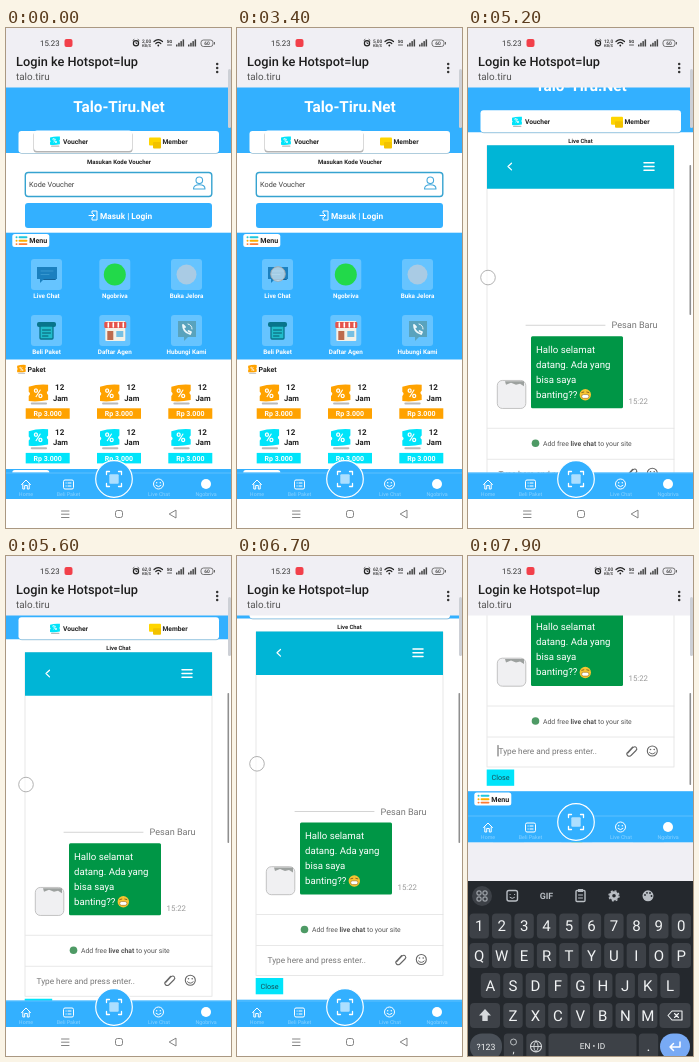
Animation of 225 by 500 pixels, one loop 8 s. Source, as an HTML page:

```html
<!DOCTYPE html>
<html lang="id">
<head>
<meta charset="utf-8">
<title>Hotspot login</title>
<style>
html, body { margin: 0; width: 100%; height: 100%; overflow: hidden; background: #fff; }
svg { display: block; width: 225px; height: 500px; font-family: Roboto, Arial, sans-serif; text-rendering: geometricPrecision; }
</style>
</head>
<body>
<svg id="stage" viewBox="0 0 225 500"></svg>
<script>
const BLUE = '#33b0ff', CYAN = '#00e4fa', ORANGE = '#ffa200', INK = '#222', PALE = '#f0eff4';

// Drawing helpers
const rect = (x, y, w, h, fill, r = 0, extra = '') =>
  `<rect x="${x}" y="${y}" width="${w}" height="${h}" rx="${r}" fill="${fill}" ${extra}/>`;
const disc = (x, y, r, fill, extra = '') => `<circle cx="${x}" cy="${y}" r="${r}" fill="${fill}" ${extra}/>`;
const line = (d, color, w = 1, extra = '') =>
  `<path d="${d}" fill="none" stroke="${color}" stroke-width="${w}" stroke-linecap="round" stroke-linejoin="round" ${extra}/>`;
const shape = (d, fill) => `<path d="${d}" fill="${fill}"/>`;
const text = (x, y, size, str, fill = INK, weight = 400, anchor = 'start', extra = '') =>
  `<text x="${x}" y="${y}" font-size="${size}" fill="${fill}" font-weight="${weight}" text-anchor="${anchor}" ${extra}>${str}</text>`;
const group = (id, body, extra = '') => `<g id="${id}" ${extra}>${body}</g>`;
const at = (x, y, body, s = 1) => `<g transform="translate(${x} ${y}) scale(${s})">${body}</g>`;

const ticket = color => rect(3, 18.5, 16, 2, '#b9b9b9', 1) +
  shape('M1 3Q10 0 20 1V7Q17.500 9 20 11V16Q10 18 1 17V12Q3.500 10 1 8Z', color) +
  text(10.3, 13.8, 13, '%', '#fff', 700, 'middle');

function header() {
  return rect(0, 59, 225, 66, BLUE) +
    text(113, 83.5, 15.3, 'Talo-Tiru.Net', '#fff', 700, 'middle') +
    rect(13, 104, 200, 22, '#1c6f9f', 3, 'opacity=".35"') +
    rect(12.5, 103, 200.5, 22, '#fff', 3) +
    group('active', rect(27.5, 104, 99, 20.5, '#777', 3, 'opacity=".55"') + rect(28, 102.5, 98, 20.5, '#fff', 3)) +
    group('voucher', at(43.5, 109, ticket(CYAN), .52) + text(57, 116.7, 6.7, 'Voucher', INK, 700)) +
    rect(143, 109.5, 12, 8, '#ffd500', 1) + rect(147, 114, 8, 6.5, '#f2c200', 1) +
    text(156.5, 116.4, 6.7, 'Member', INK, 700);
}

function login() {
  return text(113, 136, 6, 'Masukan Kode Voucher', INK, 700, 'middle') +
    rect(19.3, 144.5, 186.5, 24, '#fff', 3, 'stroke="#36a3d0" stroke-width="1.4"') +
    text(23, 159, 7.3, 'Kode Voucher', '#444') +
    disc(193.3, 152.3, 3.3, 'none', 'stroke="#45a9dc" stroke-width="1.1"') +
    line('M187.500 161Q187.500 156.700 193.300 156.700T199 161Z', '#45a9dc', 1.1) +
    rect(19, 175, 187, 25, BLUE, 3) +
    line('M86 185V183H91V192H86V190M83 187.500H88.500M86.500 185.500L88.500 187.500L86.500 189.500', '#fff') +
    text(94, 190.5, 8.3, 'Masuk | Login', '#fff', 700);
}

const tileIcons = [
  rect(10, 12, 15, 9, '#146399', 1) + shape('M6 8H26V20H13L9 24V20H6Z', '#1b80bf') + line('M10 12H22M10 15.500H18', '#3f9dd4', .8),
  disc(15.5, 15.5, 11, '#22d94a'),
  disc(15.5, 15.5, 10, '#a9cbe4'),
  rect(6, 7, 19, 5, '#08758c', 2) + rect(9, 11, 13, 13, '#20bccb', 1, 'stroke="#08758c" stroke-width="1.3"') +
    line('M11.500 15H19.500M11.500 18H19.500M11.500 21H17', '#075a6c'),
  rect(6, 6, 20, 20, '#f5f1e7', 1) + rect(5, 7, 22, 6, '#e5534b', 1) +
    line('M9 8V12M14 8V12M19 8V12M24 8V12', '#fff', 1.6) + rect(8, 16, 6, 9, '#bd6a4d') + rect(17, 16, 7, 6, '#77bfe2'),
  shape('M7 6H25V22H17L13 26V22H7Z', '#59a3bd') +
    line('M12 10Q12 17 19 19L20 17L17.500 16M12 10L14 12', '#eef8fb', 1.8) + line('M17 9Q21 10 21 14', '#eef8fb')
];
const tileNames = ['Live Chat', 'Ngobriva', 'Buka Jelora', 'Beli Paket', 'Daftar Agen', 'Hubungi Kami'];

function menu() {
  const tiles = tileIcons.map((icon, i) => {
    const x = [25, 93.3, 165][i % 3], y = 231 + 56 * Math.floor(i / 3);
    return at(x, y, rect(0, 0, 31, 31, '#66c4ff', 3) + icon +
      text(15.5, 39.3, 6.3, tileNames[i], '#fff', 700, 'middle'));
  }).join('');
  const packs = [0, 1, 2, 3, 4, 5].map(i => {
    const color = i < 3 ? ORANGE : CYAN;
    return at(19.7 + 71.3 * (i % 3), i < 3 ? 355.7 : 400.3,
      at(2, 0, ticket(color), 1.02) +
      text(34, 6.3, 8, '12', INK, 700, 'middle') + text(34.8, 17, 7.7, 'Jam', INK, 700, 'middle') +
      rect(0, 24.6, 44, 10.5, color) + text(22, 32.4, 7, 'Rp 3.000', '#fff', 700, 'middle'));
  }).join('');
  const bullets = [['#20c7dd', 209.3], ['#ffb000', 212.7], ['#ff7c35', 216.1]]
    .map(([color, y]) => line(`M10.500 ${y}H10.600M13.500 ${y}H20.500`, color, 1.9)).join('');
  return rect(0, 204.7, 225, 128, BLUE) + rect(6.3, 206, 37, 13, '#fff', 2.5) + bullets +
    text(23.2, 215.2, 7.1, 'Menu', INK, 700) + tiles +
    rect(0, 331.5, 225, 110, '#fff') +
    at(10.7, 336.5, ticket(ORANGE), .45) + text(21.5, 343.8, 7, 'Paket', INK, 700) +
    packs + rect(0, 441, 225, 8, BLUE) + rect(6.3, 442, 37, 6, '#fff', 2.5);
}

function chat() {
  const bubble = ['Hallo selamat', 'datang. Ada yang', 'bisa saya', 'banting??']
    .map((s, i) => text(68, 345.3 + 15 * i, 9.65, s, '#fff')).join('');
  return text(112.5, 135.6, 5.8, 'Live Chat', INK, 700, 'middle') +
    rect(19, 138.5, 187, 343.5, '#fff', 0, 'stroke="#e2e2e2" stroke-width=".8"') +
    rect(19, 138, 187, 43.5, '#00b5d6') +
    line('M43.500 156L40 159.300L43.500 162.600', '#fff', 1.2) +
    line('M176 155.500H186M176 159.300H186M176 163H186', '#fff', 1.5) +
    line('M58 318H137', '#c9c9c9', .8) + text(143.5, 321, 9.1, 'Pesan Baru', '#777') +
    rect(63, 329, 92, 72, '#009646', 1.5) + bubble +
    disc(117.3, 387.5, 5.7, '#f7c531') + rect(113.7, 387.3, 7.2, 3.8, '#fff', 1.8, 'stroke="#956b1d" stroke-width=".6"') +
    line('M113.800 385.300L115.800 384.800M118.800 384.800L120.800 385.300', '#74521a', .8) +
    text(160.5, 396.3, 7.8, '15:22', '#999') +
    rect(29.3, 373.2, 28.5, 28, '#f0f0f2', 5, 'stroke="#bdbdbd" stroke-width=".9"') +
    shape('M37 374H56V379L52 376.500L48 377.500L43 375.500L38 377.500Z', '#9da19f') +
    line('M19.500 421H206M19.500 452H206', '#e2e2e2', .8) +
    disc(67.5, 436, 3.8, '#4e9a65') +
    text(75, 438.6, 6.85, 'Add free <tspan font-weight="700">live chat</tspan> to your site', '#555') +
    text(30.5, 469.3, 8.25, 'Type here and press enter..', '#777') +
    line('M160 468L165 462.500Q167 461 168.300 462.500T168 465.500L163 470.500Q161 472 159.500 470.500T159.500 467.500L164.500 462', '#666', 1.1) +
    disc(184.3, 466, 5, 'none', 'stroke="#666" stroke-width="1.1"') + disc(182.5, 464.5, .8, '#666') + disc(186.2, 464.5, .8, '#666') +
    line('M181.500 467.500Q184.300 470.500 187.200 467.500', '#666') +
    group('caret', line('M30 460.500V471', '#333', .8)) +
    rect(18.7, 484.5, 27.5, 16.3, CYAN) + text(32.5, 495.1, 7.2, 'Close', '#164b55', 400, 'middle');
}

function nav() {
  const label = (x, s) => text(x, 468, 5.3, s, '#fff', 400, 'middle', 'opacity=".42"');
  return rect(0, 444.5, 225, 27, BLUE) + line('M0 445H225', '#68c5ff', .8) +
    line('M15.500 456.500L20 452L24.500 456.500M16.800 456V461H18.700V457.500H21.300V461H23.200V456', '#fff') +
    rect(57.5, 452, 10, 9, 'none', 1.5, 'stroke="#fff"') + line('M60 455H60.200M62 455H65M60 458H60.200M62 458H65', '#fff') +
    disc(152.5, 456, 5, 'none', 'stroke="#fff"') + disc(150.7, 454.8, .7, '#fff') + disc(154.3, 454.8, .7, '#fff') +
    line('M150 457.500Q152.500 460 155 457.500', '#fff') +
    disc(200, 456, 5, '#fff') +
    label(20, 'Home') + label(62.5, 'Beli Paket') + label(153, 'Live Chat') + label(200, 'Ngobriva') +
    disc(108, 451, 18.3, BLUE, 'stroke="#fff" stroke-width="1.2"') +
    line('M100.500 446.500V443.500H103.500M112.500 443.500H115.500V446.500M115.500 455.500V458.500H112.500M103.500 458.500H100.500V455.500', '#fff', 1.3) +
    rect(103.3, 446.3, 9.4, 9.4, '#fff', 1, 'opacity=".6"');
}

function system() {
  const bars = x => [0, 1, 2, 3].map(i => rect(x + i * 2.2, 16.5 - i * 1.7, 1.5, 2 + i * 1.7, '#444')).join('');
  return rect(0, 0, 225, 59.5, PALE) + text(34, 18, 7.8, '15.23', '#333') + rect(58.5, 11, 8, 8, '#f2404a', 2) +
    disc(130, 15.3, 2.6, 'none', 'stroke="#222" stroke-width="1.2"') + line('M127 12.300L128 11.500M133 12.300L132 11.500M130 14V15.500H131', '#222', .8) +
    text(140.5, 14.6, 4.8, '', '#333', 500, 'middle', 'id="speed"') + text(140.5, 18.8, 4, 'KB/S', '#333', 500, 'middle') +
    line('M148 13.500Q152.300 9.800 156.500 13.500M149.800 15.500Q152.300 13.400 154.800 15.500', '#222', 1.2) + disc(152.3, 17.5, .9, '#222') +
    text(163.5, 14.5, 4.3, '5G', '#333', 700, 'middle') + line('M161.500 17H165.500', '#333', .8) +
    bars(170) + bars(182) +
    rect(195, 12, 12, 6.5, 'none', 2.5, 'stroke="#666" stroke-width=".9"') + text(201, 17.1, 4.8, '60', '#333', 500, 'middle') +
    rect(208, 14, 1, 2.5, '#666') +
    text(10, 38, 12.75, 'Login ke Hotspot=lup', '#1d1d1d', 500) + text(10, 52.3, 9.9, 'talo.tiru', '#555') +
    [36, 40, 44].map(y => disc(211.2, y, 1.25, '#333')).join('');
}

function keyboard() {
  const key = (x, y, w, s, size = 15) => rect(x - w / 2, y - 12.5, w, 25, '#3d4147', 4) +
    text(x, y + size * .36, size, s, '#f1f3f4', 400, 'middle');
  const row = (chars, x0, y) => [...chars].map((c, i) => key(x0 + 22.45 * i, y, 19.4, c)).join('');
  const tool = '#b9bec4';
  return rect(0, 325, 225, 180, '#24282d') +
    rect(4, 330, 20, 20, '#3d4147', 10) +
    [[11, 337], [17, 337], [11, 343], [17, 343]].map(([x, y]) => rect(x - 2, y - 2, 4, 4, 'none', 1, `stroke="${tool}"`)).join('') +
    rect(39, 334.5, 10.5, 10.5, 'none', 2, `stroke="${tool}" stroke-width="1.4"`) + line('M42 338.500H42.200M46.500 338.500H46.700M42 341.500Q44.300 343.500 46.500 341.500', tool) +
    text(78.5, 343, 8.8, 'GIF', tool, 700, 'middle') +
    rect(108, 334.5, 9, 11, 'none', 1, `stroke="${tool}" stroke-width="1.4"`) + rect(110, 333, 5, 3, tool) + line('M110.500 339H114.500M110.500 342H114.500', tool) +
    disc(146, 339.8, 3.2, 'none', `stroke="${tool}" stroke-width="2.8"`) + disc(146, 339.8, 5, 'none', `stroke="${tool}" stroke-width="1.4" stroke-dasharray="2 1.93"`) +
    disc(180, 339.8, 5.5, tool) + [[177, 339], [179, 336.8], [182, 337], [183.5, 340]].map(([x, y]) => disc(x, y, .9, '#22262b')).join('') +
    row('1234567890', 11.2, 370) + row('QWERTYUIOP', 11.2, 399.5) + row('ASDFGHJKL', 22.5, 429.5) + row('ZXCVBNM', 45, 459.5) +
    key(17, 459.5, 30, '') + shape('M17 453L23 459.500H19.700V465H14.300V459.500H11Z', '#d6d9dc') +
    key(207, 459.5, 31, '') + line('M200 459.500L204 455H214V464H204ZM206.500 457.500L210.500 461.500M210.500 457.500L206.500 461.500', '#f1f3f4', 1.1) +
    rect(2, 477.5, 32, 26, '#4a5058', 12) + text(18, 493.5, 8.7, '?123', '#f1f3f4', 400, 'middle') +
    key(45.5, 490, 19.4, '') + disc(45.5, 486, 3, 'none', 'stroke="#d9dcdf" stroke-width=".8"') + text(45.5, 497, 11, ',', '#f1f3f4', 400, 'middle') +
    key(68, 490, 19.4, '') + disc(68, 490.5, 5.5, 'none', 'stroke="#d9dcdf" stroke-width="1.1"') + line('M62.500 490.500H73.500M68 485Q63.500 490.500 68 496Q72.500 490.500 68 485', '#d9dcdf', .9) +
    key(124.5, 490, 88, 'EN • ID', 8.3) + key(180.5, 490, 19.4, '.') +
    rect(192, 477.5, 30, 26, '#78aaf5', 13) + line('M212 486V491H202M205.500 487.500L202 491L205.500 494.500', '#fff', 1.5);
}

const stage = document.getElementById('stage');
stage.innerHTML = `<clipPath id="view"><rect id="viewBox" y="59" width="225" height="412"/></clipPath>` +
  rect(0, 0, 225, 500, '#fff') +
  `<g clip-path="url(#view)">` +
    group('page', header() + group('login', login()) + group('chat', chat()) + group('menu', menu())) + group('nav', nav()) +
  `</g>` + system() +
  line('M55.500 483H63M55.500 486.200H63M55.500 489.500H63', '#777', .9) +
  rect(109.5, 482.5, 7, 7, 'none', 2, 'stroke="#777" stroke-width=".9"') + line('M170 482.500V490L163.500 486.200Z', '#777', .9) +
  rect(222, 41, 3, 59, '#cdd0d6', 1.5) + rect(221.5, 137, 1.6, 150, '#8f8f8f', .7, 'id="scrollbar"') +
  rect(0, 286.5, 225, 214, PALE, 0, 'id="gap"') +
  group('keys', keyboard()) +
  disc(0, 0, 7.3, '#fff', 'id="touch" fill-opacity=".6" stroke="#aaa" stroke-width=".9"');

const $ = id => document.getElementById(id);
const show = (id, on) => $(id).setAttribute('display', on ? 'inline' : 'none');
const move = (id, x, y) => $(id).setAttribute('transform', `translate(${x} ${y})`);

const LOOP = 8000, STEP = 100, OPEN_CHAT = 3900, FOCUS = 7700;
const scrollSteps = [[0, 0], [4900, 0], [5500, 41.5], [5700, 42], [6200, 45], [6400, 47], [7000, 78], [7600, 78], [7700, 271]];
const keySteps = [[0, 190], [7600, 190], [7900, 0]];
const speeds = [[0, '2,00'], [2600, '5,00'], [3700, '12,0'], [5500, '62,0'], [6900, '92,0'], [7800, '7,00']];

function mix(steps, t) {
  const i = steps.findIndex(s => s[0] > t);
  if (i < 0) return steps[steps.length - 1][1];
  const [t0, a] = steps[i - 1], [t1, b] = steps[i];
  return a + (b - a) * (t - t0) / (t1 - t0);
}

function touchAt(t, scroll) {
  if (t >= 3400 && t < 3700) return [41, 246];
  if (t >= 4900 && t < 7100) return [20, 270.3 - scroll];
  if (t >= 7300 && t < 7500) return [115.5, 388];
  return null;
}

function draw(now) {
  const t = Math.floor(now % LOOP / STEP) * STEP;
  const inChat = t >= OPEN_CHAT, typing = t >= FOCUS;
  const scroll = mix(scrollSteps, t), touch = touchAt(t, scroll);
  show('login', !inChat);
  show('active', !inChat);
  show('chat', inChat);
  show('caret', typing);
  move('voucher', 0, inChat ? 0 : -1);
  move('menu', 0, inChat ? 301.5 : 0);
  move('page', 0, -scroll);
  move('nav', 0, typing ? -185 : 0);
  $('viewBox').setAttribute('height', typing ? 227.5 : 412);
  move('keys', 0, mix(keySteps, t));
  show('keys', typing);
  show('gap', typing);
  show('scrollbar', scroll > 0);
  $('scrollbar').setAttribute('height', typing ? 92 : 150);
  $('speed').textContent = speeds.filter(s => s[0] <= t).pop()[1];
  show('touch', touch);
  if (touch) move('touch', ...touch);
}

const start = performance.now();
function tick() {
  draw(performance.now() - start);
  requestAnimationFrame(tick);
}
tick();
</script>
</body>
</html>
```
